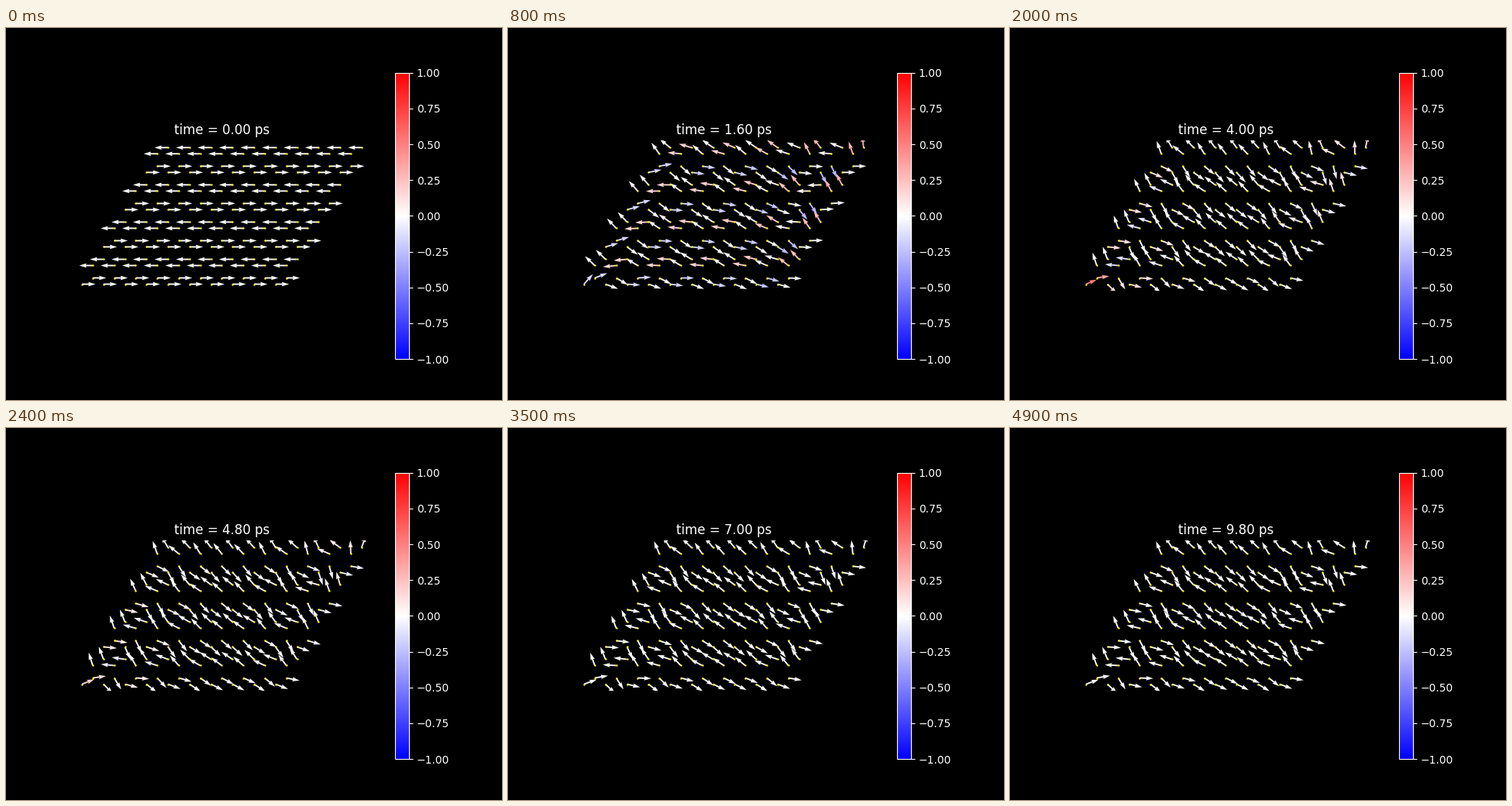
Animation, 640 px wide and 480 px high, one loop 5 s. Source, as a matplotlib script:

```python
import numpy as np
import matplotlib.pyplot as plt
from matplotlib.animation import FuncAnimation

COLS, ROWS, FRAMES, STEP_PS = 10, 8, 50, 0.2

plt.style.use("dark_background")
fig, ax = plt.subplots(figsize=(6.4, 4.8), dpi=100)

# Honeycomb lattice with unit spacing; sub picks one of the two atoms in a cell.
row, sub, col = (g.ravel() for g in np.meshgrid(
    np.arange(ROWS), [0, 1], np.arange(COLS), indexing="ij"))
x = col + (row + sub) / 2
y = row * np.sqrt(3) / 2 + sub / (2 * np.sqrt(3))

sign = 1 - 2 * (row % 2)             # rows point right, left, right, ...
parity = sign * (1 - 2 * (col % 2))  # the two kinds of site within a row
side = x / 6.5 - 1                   # -1 at the left edge, 1 at the right
outer = np.isin(2 * row + sub, [0, 2 * ROWS - 1])
tilt = -38 - 11 * (2 * row / (ROWS - 1) - 1) ** 3


def pulse(t, peak, power):
    """Rise from 0 to 1 at the peak time, then fade."""
    return (t / peak * np.exp(1 - t / peak)) ** power


def smooth(u):
    u = np.clip(u, 0, 1)
    return u * u * (3 - 2 * u)


def settle(t, tau=1.6, omega=0.75):
    """Damped step response from 0 to 1 with a slight overshoot."""
    wave = np.cos(omega * t) + np.sin(omega * t) / (tau * omega)
    return 1 - np.exp(-t / tau) * wave


def spins(t):
    """In-plane angle in degrees and out-of-plane part of every spin."""
    # The alternating bend starts at the edges and spreads into a linear ramp.
    early = 13 + 18 * np.exp(-col) - 23 * (1 + np.tanh((x - 9.2) / 1.2))
    late = 6 * (6.6 - x)
    bend = smooth(t / 1.2) * (early + (late - early) * smooth((t - 1.6) / 1.6))
    turn = settle(t) + 0.22 * pulse(t, 1.7, 4) * side
    angle = tilt * turn + parity * bend * np.where(outer, 0.5, 1)
    angle += np.where(sign > 0, 0, 180)

    # The two loose corner spins swing more widely than the rest.
    angle[0] = 20 * settle(t) + 42 * pulse(t, 1.2, 3)
    angle[-1] = 73 + 107 * np.exp(-t / 1.5) * np.cos(2 * np.pi * t / 1.4)

    active = np.where(parity > 0, 1, 0.15)
    right, left = np.clip(side, 0, 1), np.clip(-side, 0, 1)
    sz = active * (0.2 * pulse(t, 3.2, 8) * left
                   - (0.27 + 0.2 * right) * pulse(t, 1, 3))
    sz -= 0.1 * right * pulse(t, 4, 20)
    sz += 0.6 * (row == 0) * np.exp(-x / 0.9) * pulse(t, 3.2, 20)
    return np.radians(angle), sign * sz


def components(t):
    phi, sz = spins(t)
    flat = np.sqrt(1 - sz ** 2)
    return flat * np.cos(phi), flat * np.sin(phi), sz


arrows = ax.quiver(x, y, *components(0), cmap="bwr", clim=(-1, 1),
                   scale=1.8 * np.sqrt(x.size), width=0.06 / np.sqrt(x.size))
ax.scatter(x, y, s=3, color="yellow", linewidths=0, zorder=1)
fig.colorbar(arrows, ax=ax)
ax.set_aspect("equal")
ax.set_xlim(-0.05 * x.max(), 1.05 * x.max())
ax.set_ylim(-0.05 * y.max(), 1.05 * y.max())
ax.axis("off")
title = ax.set_title("")


def update(frame):
    t = frame * STEP_PS
    arrows.set_UVC(*components(t))
    title.set_text(f"time = {t:.2f} ps")
    return arrows, title


anim = FuncAnimation(fig, update, frames=FRAMES, interval=1000 * 5 / FRAMES,
                     repeat=True, repeat_delay=0)
plt.show()
```
